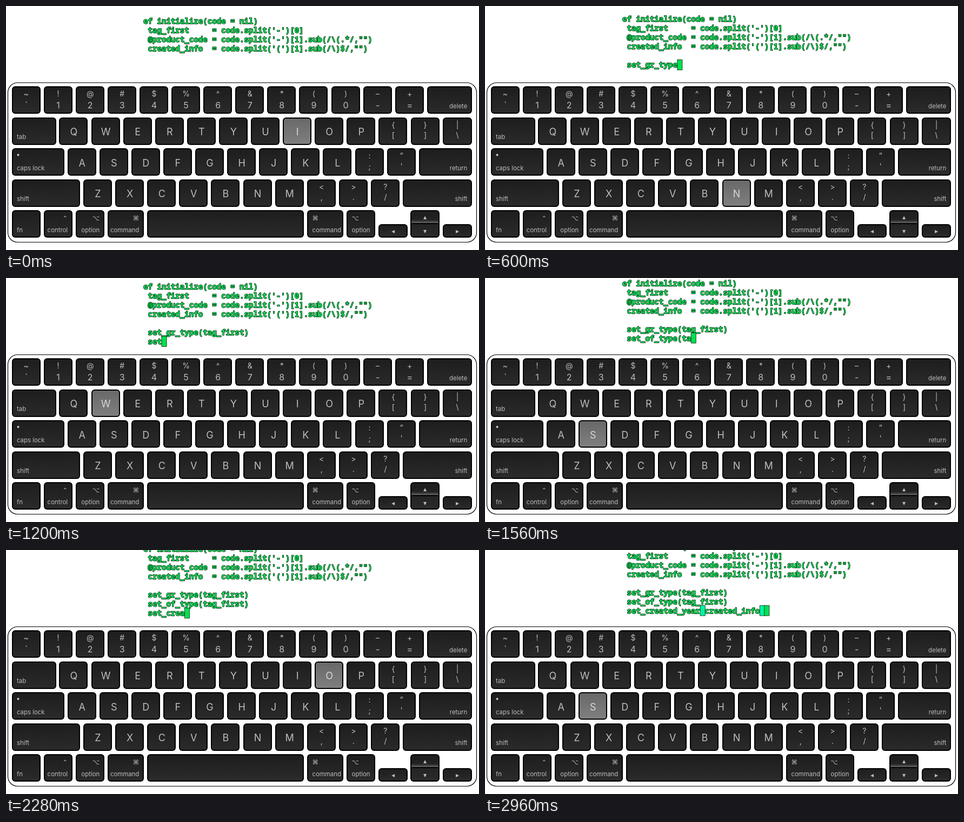
These frames come from a looping animation (875 by 453 pixels, 3000 ms). An HTML page with a canvas:

```html
<!DOCTYPE html>
<html lang="en">
<head>
<meta charset="utf-8">
<title>Typing code</title>
<style>
html, body { margin: 0; width: 100%; height: 100%; overflow: hidden; background: #fff; }
canvas { display: block; }
</style>
</head>
<body>
<canvas id="stage" width="875" height="453"></canvas>
<script>
const ctx = document.getElementById("stage").getContext("2d");
const LOOP = 3000;
const UI = "Inter, Roboto, sans-serif";
const SYMBOLS = '"DejaVu Sans", sans-serif';

// Keyboard
const ROWS = [
  "~` !1 @2 #3 $4 %5 ^6 &7 *8 (9 )0 –- += delete",
  "tab Q W E R T Y U I O P {[ }] |\\",
  "caps_lock A S D F G H J K L :; “' return",
  "shift Z X C V B N M <, >. ?/ shift",
  "fn ⌃control ⌥option ⌘command space ⌘command ⌥option"
].map(row => row.split(" "));
const WIDTHS = { tab: 81.8, caps_lock: 97, shift: 126.4, "⌘command": 67, space: 290 };
const LEFT = 11, RIGHT = 862, TOP = 149.6, PITCH = 57.5;
const KEY = 53, KEY_H = 51, GAP = 6.1;
const PRESSED = "IKNOWSPOTS";

// Code
const WRITTEN = [
  "ef initialize(code = nil)",
  " tag_first     = code.split('-')[0]",
  " @product_code = code.split('-')[1].sub(/\\(.*/,\"\")",
  " created_info  = code.split('(')[1].sub(/\\)$/,\"\")"
];
const TYPED = ["set_gr_type(tag_first)", "set_of_type(tag_first)", "set_created_year(created_info)"];
// [time, characters typed, counting line breaks]
const PACE = [[0, -2], [600, 11], [1200, 26], [1560, 37], [1960, 46], [2600, 63], [2960, 76], [3000, 76]];
const CODE_X = 254, CODE_Y = 32.7, LINE = 17;

function box(x, y, w, h, r, fill) {
  ctx.beginPath();
  ctx.roundRect(x, y, w, h, r);
  ctx.fillStyle = fill;
  ctx.fill();
}

function label(text, x, y, size, align = "center", family = UI, color = "#bdbdbd") {
  ctx.font = `${size}px ${family}`;
  ctx.textAlign = align;
  ctx.fillStyle = color;
  ctx.fillText(text, x, y);
}

// Keys sit on whole pixels so that their edges stay sharp
function cap(left, top, width, h = KEY_H, lit = false) {
  const x = Math.floor(left), y = Math.floor(top), w = Math.round(width);
  const shade = ctx.createLinearGradient(0, y, 0, y + h);
  shade.addColorStop(0, lit ? "#686868" : "#1d1d1d");
  shade.addColorStop(1, lit ? "#808080" : "#2b2b2b");
  box(x, y, w, h, 6, "#000");
  box(x + 2, y + 2, w - 4, h - 4, 4, shade);
}

function drawWord(text, x, y, w, toRight) {
  const edge = toRight ? x + w - 9 : x + 9;
  const align = toRight ? "right" : "left";
  if (text > "⌀") {
    label(text[0], edge, y + 18.5, 11.5, align, SYMBOLS);
    text = text.slice(1);
  }
  label(text.replace("_", " "), edge, y + 40, 11.4, align);
}

function drawRow(row, r, pressed) {
  const y = TOP + r * PITCH;
  let x = LEFT;
  row.forEach((name, i) => {
    const last = r < 4 && i === row.length - 1;
    const w = last ? RIGHT - Math.floor(x) : WIDTHS[name] || KEY;
    const mid = x + w / 2;
    cap(x, y, w, KEY_H, name === pressed);
    if (name.length === 1) {
      label(name, mid, y + 33, 18, "center", UI, name === pressed ? "#d8d8d8" : "#bdbdbd");
    } else if (name.length === 2 && name !== "fn") {
      label(name[0], mid, y + 18.5, 14);
      label(name[1], mid, y + (r ? 38.3 : 40.3), r ? 14 : 16);
    } else if (name !== "space") {
      drawWord(name, x, y, w, last || (r === 4 && i > 0 && i < 4));
    }
    x += w + GAP;
  });
}

function drawArrows() {
  const y = Math.floor(TOP + 4 * PITCH);
  cap(689, y + 26, KEY + 1, 25);
  cap(808, y + 26, KEY + 1, 25);
  cap(748, y, KEY + 1);
  const shine = ctx.createLinearGradient(0, y + 18, 0, y + 24);
  shine.addColorStop(0, "#222");
  shine.addColorStop(1, "#666");
  box(750, y + 18, KEY - 3, 6, 0, shine);
  box(750, y + 24, KEY - 3, 2, 0, "#000");
  [["▲", 775, 395], ["▼", 775, 420.5], ["◀", 716, 420.5], ["▶", 835, 420.5]]
    .forEach(([glyph, x, base]) => label(glyph, x, base, 8, "center", SYMBOLS));
}

function drawKeyboard(pressed) {
  box(3.5, 142.5, 867, 296, 18, "#fff");
  ctx.strokeStyle = "#000";
  ctx.lineWidth = 1.2;
  ctx.stroke();
  ROWS.forEach((row, r) => drawRow(row, r, pressed));
  drawArrows();
  box(20.5, 274.5, 4, 4, 2, "#ccc");
}

function typedCount(t) {
  const i = PACE.findIndex(([time]) => time > t);
  const [t0, n0] = PACE[i - 1], [t1, n1] = PACE[i];
  return Math.floor(n0 + (n1 - n0) * (t - t0) / (t1 - t0) + 0.01);
}

function codeLine(text, y) {
  ctx.strokeText(text, CODE_X, y);
  ctx.fillText(text, CODE_X, y);
}

function block(col, cell, y, color) {
  box(CODE_X + col * cell, y - 14.7, cell + 0.7, 19, 0, color);
  ctx.lineWidth = 0.8;
  ctx.stroke();
}

function drawCode(t) {
  const scroll = LINE * (1 - Math.cos(Math.PI * t / LOOP));
  const lineY = i => CODE_Y - scroll + i * LINE;
  ctx.font = 'bold 14.14px "Noto Sans Mono", "DejaVu Sans Mono", monospace';
  ctx.textAlign = "left";
  ctx.lineJoin = "round";
  ctx.lineWidth = 1.4;
  ctx.strokeStyle = "#001a08";
  ctx.fillStyle = "#00e454";
  const cell = ctx.measureText("0").width;
  WRITTEN.forEach((text, i) => codeLine(text, lineY(i)));

  let left = typedCount(t), caret;
  TYPED.forEach((text, i) => {
    if (left > 0) {
      const y = lineY(i + 5);
      codeLine(" " + text.slice(0, left), y);
      if (left <= text.length) caret = { text, col: left + 1, y };
    }
    left -= text.length + 1;
  });
  if (!caret) return;
  const { text, col, y } = caret;
  if (col > text.length) {
    block(text.indexOf("(") + 1, cell, y, "#00f5a0");
    block(text.length, cell, y, "#00f5a0");
  }
  block(col, cell, y, "#00e052");
}

function frame(now) {
  const t = now % LOOP;
  ctx.fillStyle = "#fff";
  ctx.fillRect(0, 0, 875, 453);
  drawCode(t);
  drawKeyboard(PRESSED[Math.floor(t / 300)]);
}

const start = performance.now();
function tick() {
  frame(performance.now() - start);
  requestAnimationFrame(tick);
}
tick();
</script>
</body>
</html>
```
